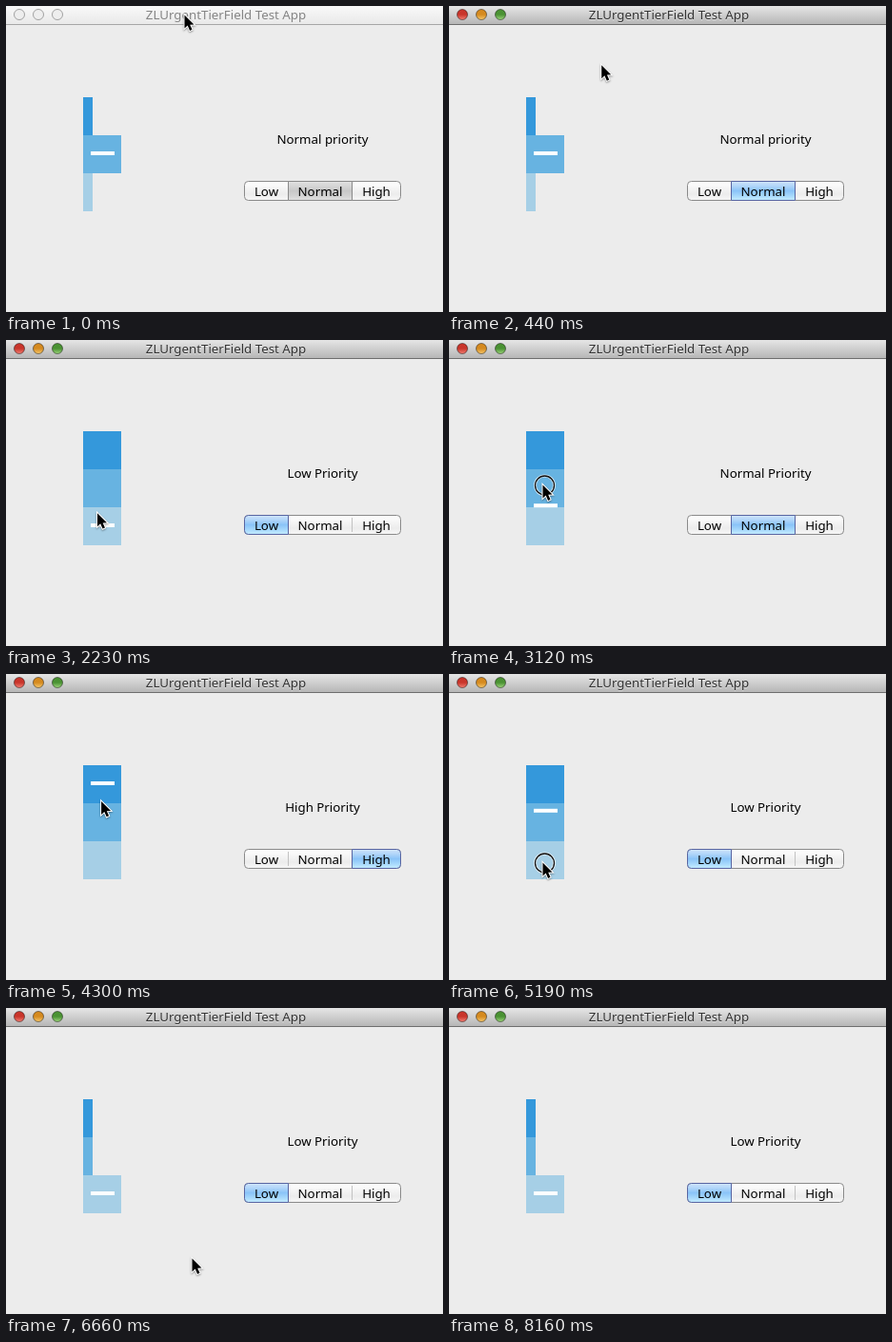
An HTML page with a canvas that plays this animation: 459x322 px, repeating every 8.44 s.

```html
<!DOCTYPE html>
<html lang="en">
<head>
<meta charset="utf-8">
<title>Priority control</title>
<style>
html, body { margin: 0; width: 459px; height: 322px; overflow: hidden; background: #ececec; }
canvas { display: block; }
</style>
</head>
<body>
<canvas id="stage" width="459" height="322"></canvas>
<script>
const c = document.getElementById('stage').getContext('2d');
const LOOP = 8440, STEP = 148.2;
const clamp = v => Math.max(0, Math.min(1, v));
const mix = (a, b, p) => a + (b - a) * p;
const ease = p => (p + p * p * (3 - 2 * p)) / 2;

// Levels: 0 high, 1 normal, 2 low
const bars = ['#3498db', '#67b3e1', '#a6cfe6'];
const names = ['High Priority', 'Normal Priority', 'Low Priority'];
const segments = [['Low', 250, 296, 2], ['Normal', 296, 363, 1], ['High', 363, 414, 0]];

// Clicks: step, chosen level
const clicks = [[11, 2], [21, 1], [27, 0], [35, 2]];

// Pointer moves: first step, last step, x, y
const moves = [
  [2, 7, 95, 187], [15, 19, 98, 152], [23, 25, 100, 117], [29, 32, 98, 198],
  [41, 45, 195, 263], [49, 50, 321, 300], [53, 55, 424, 329]
];

function pointerAt(k) {
  let x = 187, y = 9;
  for (const [from, to, tx, ty] of moves) {
    const p = ease(clamp((k - from + 1) / (to - from + 1)));
    x = mix(x, tx, p);
    y = mix(y, ty, p);
  }
  return [x, y];
}

function choiceAt(k) {
  let level = 1, dash = 1, pressed = false;
  for (const [at, next] of clicks) {
    if (k < at) break;
    const rate = Math.abs(next - level) > 1 ? 0.36 : 0.52;
    dash = mix(level, next, clamp((k - at + 1) * rate));
    level = next;
    pressed = k === at;
  }
  return { level, dash, pressed };
}

function gradient(y0, y1, ...colors) {
  const g = c.createLinearGradient(0, y0, 0, y1);
  colors.forEach((color, i) => g.addColorStop(i / (colors.length - 1), color));
  return g;
}

function rect(x, y, w, h, fill) {
  c.fillStyle = fill;
  c.fillRect(x, y, w, h);
}

function text(str, x, y, color = '#000') {
  c.font = '13.3px "Lucida Grande", "Noto Sans", sans-serif';
  c.textAlign = 'center';
  c.fillStyle = color;
  c.fillText(str, x, y);
}

function circle(x, y, r, stroke, width, fill) {
  c.beginPath();
  c.arc(x, y, r, 0, 7);
  if (fill) { c.fillStyle = fill; c.fill(); }
  c.strokeStyle = stroke;
  c.lineWidth = width;
  c.stroke();
}

function titleBar(active) {
  rect(0, 0, 459, 20, active ? gradient(0, 19, '#e6e6e6', '#b6b6b6') : gradient(0, 19, '#f9f9f9', '#e9e9e9'));
  rect(0, 19, 459, 1, active ? '#6e6e6e' : '#a6a6a6');
  const lights = [['#c9352b', '#f8867a'], ['#d58a1f', '#fbcf74'], ['#4a9233', '#a5dc83']];
  lights.forEach(([dark, light], i) => {
    const x = 14 + 20 * i;
    if (active) circle(x, 9, 5.5, '#00000070', 1, gradient(3, 15, dark, dark, light));
    else circle(x, 9, 5.5, '#a2a2a2', 1, '#eeeeee');
  });
  if (active) text('ZLUrgentTierField Test App', 231, 15, '#ffffff80');
  text('ZLUrgentTierField Test App', 231, 14, active ? '#333' : '#858585');
}

function priorityBars(level, dash, open) {
  bars.forEach((color, i) => rect(81, 96 + 40 * i, i === level ? 40 : mix(10, 40, open), 40, color));
  rect(89, 113 + 40 * dash, 25, 4, '#fff');
}

function segmentShape(x0, x1) {
  const l = x0 === 250 ? 4 : 0, r = x1 === 414 ? 4 : 0;
  c.beginPath();
  c.roundRect(x0 + 0.5, 184.5, x1 - x0, 20, [l, r, r, l]);
}

function segmentedControl(level, active) {
  c.lineWidth = 1;
  segmentShape(250, 414);
  c.fillStyle = gradient(184, 205, '#ffffff', '#f6f6f6', '#ececec', '#f8f8f8');
  c.fill();
  c.strokeStyle = '#8a8a8a';
  c.stroke();
  for (const x of [296, 363]) rect(x, 187, 1, 15, '#c2c2c2');
  const [, x0, x1] = segments[2 - level];
  segmentShape(x0, x1);
  c.fillStyle = active
    ? gradient(184, 205, '#d3e6fb', '#b2d6f9', '#8ac4f8', '#a6d8fc', '#c9efff')
    : gradient(184, 205, '#e2e2e2', '#d6d6d6', '#c8c8c8', '#d2d2d2', '#e2e2e2');
  c.fill();
  c.strokeStyle = active ? '#5865a2' : '#8a8a8a';
  c.stroke();
  for (const [name, a, b] of segments) text(name, (a + b) / 2 + 0.5, 200);
}

function pointer(x, y, pressed) {
  if (pressed) {
    circle(x + 2.5, y + 1, 10, '#ffffffb0', 3);
    circle(x + 2.5, y + 1, 10, '#111', 1.3);
  }
  c.save();
  c.translate(x + 0.5, y + 0.5);
  c.beginPath();
  for (const p of [[0, 0], [0, 14], [3.2, 11], [5.6, 16.4], [8, 15.3], [5.7, 10.2], [10, 10]]) c.lineTo(...p);
  c.closePath();
  c.shadowColor = '#0006';
  c.shadowBlur = 2;
  c.shadowOffsetY = 1;
  c.strokeStyle = '#fff';
  c.lineWidth = 2;
  c.stroke();
  c.shadowColor = 'transparent';
  c.fillStyle = '#000';
  c.fill();
  c.restore();
}

function draw(now) {
  // The screen updates in even steps, each held until the next
  const k = Math.floor((now % LOOP + 9) / STEP);
  const active = k > 0;
  const { level, dash, pressed } = choiceAt(k);
  const open = clamp(Math.min(k - 4, 43 - k) / 2);
  rect(0, 0, 459, 322, '#ececec');
  titleBar(active);
  priorityBars(level, dash, open);
  text(k < clicks[0][0] ? 'Normal priority' : names[level], 332.5, 145);
  segmentedControl(level, active);
  pointer(...pointerAt(k), pressed);
}

const start = performance.now();
function loop() {
  draw(performance.now() - start);
  requestAnimationFrame(loop);
}
loop();
</script>
</body>
</html>
```
